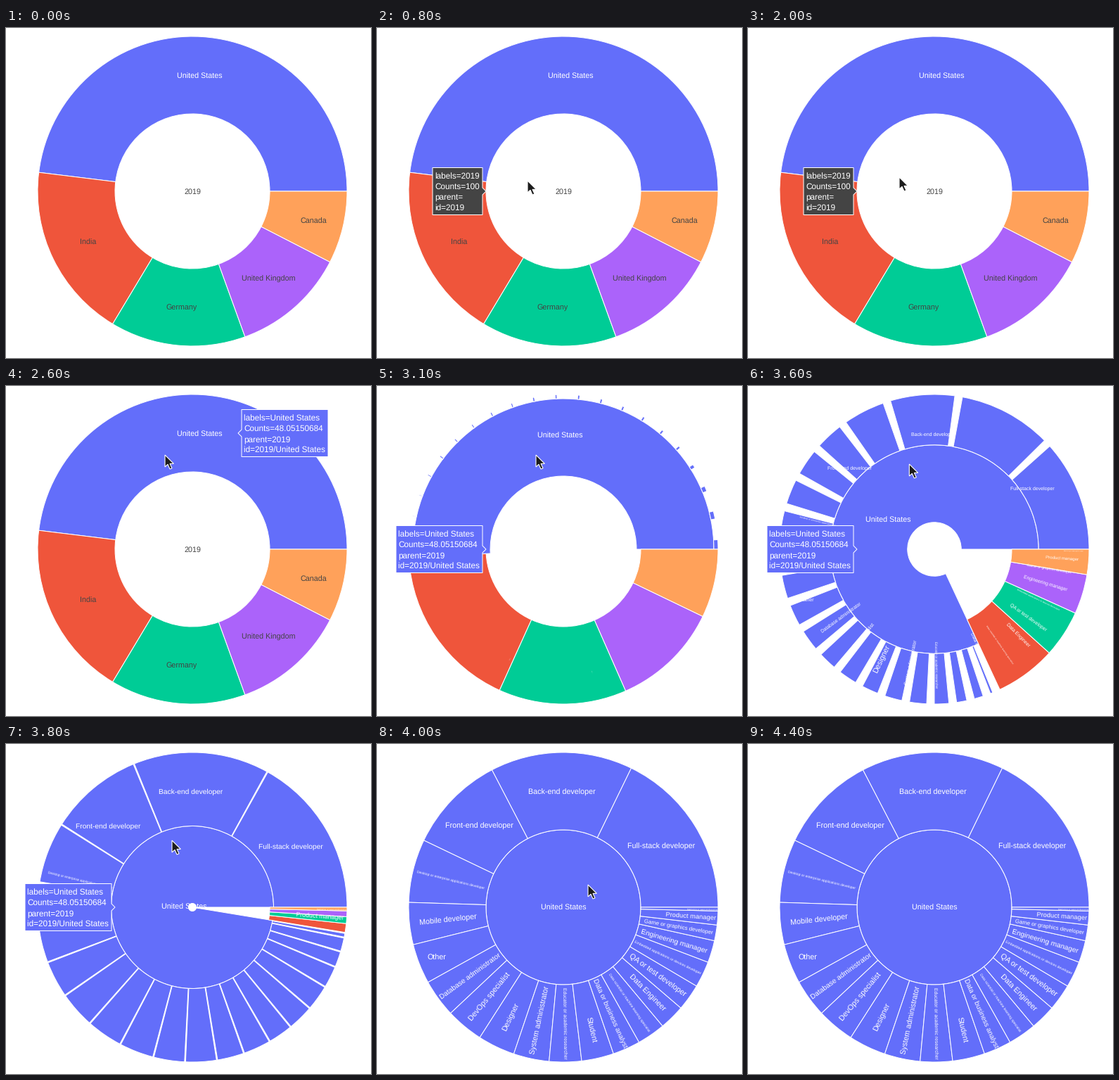
A matplotlib script that plays this animation: 519x469 px, repeating every 8000 ms.

```python
import math

import matplotlib.pyplot as plt
import numpy as np
from matplotlib.animation import FuncAnimation
from matplotlib.patches import Polygon, Wedge

plt.rcParams["text.hinting"] = "none"

W, H, DPI = 519, 469, 72
STEP_MS, LOOP_MS = 100, 8000
CX, CY = 265, 232
R_IN, R_OUT, R_TEXT = 110, 220, 164.5
BLUE, RED, GREEN, PURPLE, ORANGE = "#636efa", "#ef553b", "#00cc96", "#ab63fa", "#ffa15a"
DARK = "#444444"
LABEL_SIZE, TIP_SIZE = 10.8, 11.7

# name, colour, end angle, label radius
COUNTRIES = [
    ("United States", BLUE, 173, R_TEXT),
    ("India", RED, 239, R_TEXT),
    ("Germany", GREEN, 289.9, R_TEXT),
    ("United Kingdom", PURPLE, 332.8, R_TEXT),
    ("Canada", ORANGE, 360, 177),
]
US_END = COUNTRIES[0][2]

# name, end angle, font size, label radius
ROLES = [
    ("Full-stack developer", 64, LABEL_SIZE, R_TEXT),
    ("Back-end developer", 117.5, LABEL_SIZE, R_TEXT),
    ("Front-end developer", 154.4, LABEL_SIZE, 167),
    ("Desktop or enterprise applications developer", 178.2, 5, R_TEXT),
    ("Mobile developer", 194, LABEL_SIZE, R_TEXT),
    ("Other", 209, LABEL_SIZE, 193.5),
    ("Database administrator", 223.2, 10.1, R_TEXT),
    ("DevOps specialist", 237.3, LABEL_SIZE, R_TEXT),
    ("Designer", 251.3, LABEL_SIZE, 173),
    ("System administrator", 264.7, 10.5, R_TEXT),
    ("Educator or academic researcher", 276.8, 6.9, R_TEXT),
    ("Student", 288.9, LABEL_SIZE, 179),
    ("Data or business analyst", 299.3, 9.8, R_TEXT),
    ("Data scientist or machine learning specialist", 309.9, 5.1, R_TEXT),
    ("Data Engineer", 319.4, LABEL_SIZE, 170),
    ("QA or test developer", 329.4, 10.6, R_TEXT),
    ("Embedded applications or devices developer", 339.2, 5.2, R_TEXT),
    ("Engineering manager", 347.5, 10.3, R_TEXT),
    ("Game or graphics developer", 353.4, 7.9, 166),
    ("Product manager", 358.6, 9.4, 182),
    ("Marketing or sales professional", 360, 3.1, 198),
]
UPRIGHT = {"Full-stack developer", "Back-end developer", "Front-end developer", "Other"}
FAST_GROWING = {"Designer", "Student"}

ZOOM_MS = [2900, 3000, 3100, 3400, 3800, 3900]
ZOOM_T = [0, 0.008, 0.055, 0.355, 0.95, 1]

# time, x, y of the pointer tip
POINTER = np.array([
    (500, 312, 426), (600, 285, 352), (700, 228, 246), (800, 214, 217),
    (1900, 214, 217), (2000, 215, 212), (2100, 217, 160), (2200, 220, 100),
    (2500, 220, 100), (2600, 226, 98), (3500, 226, 98), (3800, 236, 137),
    (3900, 255, 165), (4000, 300, 200), (4100, 370, 215), (4300, 485, 222),
])
ARROW = np.array([(0, 0), (0, 17), (4, 13.3), (7, 20), (10, 18.8), (7, 12.4), (12.4, 12.4)])

# text lines, tip of the box, side (-1 left, 1 right), width, fill, ink
US_LINES = ("labels=United States", "Counts=48.05150684", "parent=2019",
            "id=2019/United States")
TIP_GERMANY = (("labels=Germany", "Counts=14.119482361", "parent=2019", "id=2019/Germany"),
               (194, 395), -1, 123, GREEN, DARK)
TIP_ROOT = (("labels=2019", "Counts=100", "parent=", "id=2019"),
            (155, 232), -1, 71, DARK, "white")
TIP_US = (US_LINES, (330, 67), 1, 123, BLUE, "white")
TIP_US_ROOT = (US_LINES, (155, 232), -1, 123, BLUE, "white")
TIP_SCHEDULE = [(500, TIP_GERMANY), (700, TIP_ROOT), (2200, TIP_US),
                (3000, TIP_US_ROOT), (4000, None)]

fig = plt.figure(figsize=(W / DPI, H / DPI), dpi=DPI, facecolor="white")
ax = fig.add_axes([0, 0, 1, 1])
ax.set_xlim(0, W)
ax.set_ylim(H, 0)
ax.axis("off")


def lerp(a, b, t):
    return a + (b - a) * t


def polar(angle, radius):
    a = math.radians(angle)
    return CX + radius * math.cos(a), CY - radius * math.sin(a)


def spans(ends):
    return list(zip([0, *ends[:-1]], ends))


COUNTRY_SPANS = spans([country[2] for country in COUNTRIES])
ROLE_SPANS = spans([role[1] for role in ROLES])


def sector(start, end, inner, outer, color):
    if end - start > 0.01 and outer - inner > 0.05:
        ax.add_patch(Wedge((CX, CY), outer, -end, -start, width=outer - inner,
                           fc=color, ec="white", lw=1))


def label(text, xy, color="white", size=LABEL_SIZE, angle=0, ha="center", z=3):
    if size >= 1:
        ax.text(*xy, text, color=color, fontsize=size, rotation=angle, ha=ha,
                va="center_baseline", rotation_mode="anchor",
                family="Liberation Sans", zorder=z)


def draw_countries():
    for (name, color, _, radius), (a0, a1) in zip(COUNTRIES, COUNTRY_SPANS):
        sector(a0, a1, R_IN, R_OUT, color)
        label(name, polar((a0 + a1) / 2, radius), "white" if color == BLUE else DARK)
    label("2019", (CX, CY), DARK)


def draw_role_label(index, start, end, t):
    name, _, size, radius = ROLES[index]
    if 0.7 < t < 1 and 4 < index < 19:
        return
    mid = (start + end) / 2
    angle = 0 if name in UPRIGHT else mid - 180 if 90 < mid < 270 else mid
    scale = min(1, 2 * t) if name in FAST_GROWING else t
    label(name, polar(mid, radius), size=size * scale, angle=angle)


def draw_zoom(t):
    """The chosen ring sector opens into the centre while its children fan out."""
    middle = lerp(R_OUT, R_IN, t)
    us_end = lerp(US_END, 360, t)
    sector(0, us_end, R_IN * (1 - t), middle, BLUE)
    for i, (a0, a1) in enumerate(ROLE_SPANS):
        origin = US_END * i / len(ROLES)
        sector(lerp(origin, a0, t), lerp(origin, a1, t), middle, R_OUT, BLUE)
    for country, (a0, a1) in zip(COUNTRIES[1:], COUNTRY_SPANS[1:]):
        sector(lerp(a0, 360, t), lerp(a1, 360, t), R_IN, R_OUT, country[1])
    for i, (a0, a1) in enumerate(ROLE_SPANS):
        draw_role_label(i, a0, a1, t)
    label("United States", polar(us_end / 2, R_TEXT * (1 - t ** 1.5)))


def draw_tooltip(lines, tip, side, width, fill, ink):
    x, y = tip
    near, far = x + 5 * side, x + (5 + width) * side
    top, bottom = y - 33.5, y + 33.5
    outline = [(x, y), (near, y - 5), (near, top), (far, top),
               (far, bottom), (near, bottom), (near, y + 5)]
    ax.add_patch(Polygon(outline, fc=fill, ec=ink, lw=1, zorder=4))
    for i, line in enumerate(lines):
        label(line, (min(near, far) + 3, y - 22.7 + 15.2 * i), ink, TIP_SIZE, ha="left", z=5)


def draw_pointer(ms):
    times, xs, ys = POINTER.T
    if times[0] <= ms <= times[-1]:
        tip = np.interp(ms, times, xs), np.interp(ms, times, ys)
        ax.add_patch(Polygon(ARROW + tip, fc="#1c1c1c", ec="white", lw=1.1, zorder=6))


def update(frame):
    ms = frame * STEP_MS
    for artist in [*ax.patches, *ax.texts]:
        artist.remove()
    if ms < 3000:
        draw_countries()
    else:
        draw_zoom(float(np.interp(ms, ZOOM_MS, ZOOM_T)))
    tooltip = None
    for start, content in TIP_SCHEDULE:
        if ms >= start:
            tooltip = content
    if tooltip:
        draw_tooltip(*tooltip)
    draw_pointer(ms)
    return []


anim = FuncAnimation(fig, update, frames=LOOP_MS // STEP_MS, interval=STEP_MS,
                     repeat=True, repeat_delay=0)
plt.show()
```
